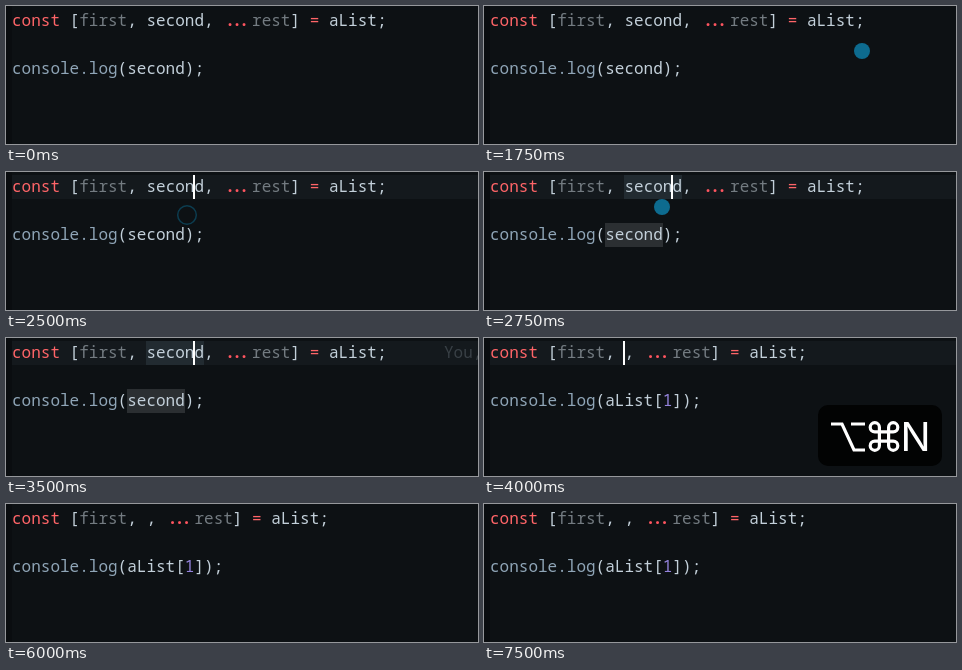
An HTML page for the animation above (8000 ms loop, 472 px wide and 138 px high).

```html
<!DOCTYPE html>
<html lang="en">
<head>
<meta charset="utf-8">
<title>Inline variable</title>
<style>
  html, body { margin: 0; width: 100%; height: 100%; overflow: hidden; background: #0d1114; }
  svg { display: block; width: 472px; height: 138px; }
  text { font: 16px "Noto Sans Mono", "DejaVu Sans Mono", monospace; white-space: pre; fill: #c3d0da; }
  .key { fill: #ff6568; }
  .unused { fill: #737b81; }
  .call { fill: #8fa5b7; }
  .num { fill: #9483dc; }
  .dots { fill: #ff5560; font-weight: 700; letter-spacing: -2.6px; }
  .blame { fill: #394046; }

  /* Every state holds until the next step. */
  .step { visibility: hidden; animation: 8s step-end infinite; }
  .before { animation-name: before; }
  .after { animation-name: after; }
  .line { animation-name: line; }
  .words { animation-name: words; }
  .note { animation-name: note; }
  .caret { animation-name: caret; fill: #fff; }
  .pointer { animation-name: pointer; fill: #0d6b8f; }
  .press { animation-name: press; fill: none; stroke: #0c3d50; stroke-width: 1.5; }
  .keys { animation-name: keys; }

  @keyframes before { 0% { visibility: visible } 50%, 100% { visibility: hidden } }
  @keyframes after { 0% { visibility: hidden } 50%, 100% { visibility: visible } }
  @keyframes line {
    0%, 62.5%, 100% { visibility: hidden }
    31.25% { visibility: visible }
  }
  @keyframes words {
    0%, 50%, 100% { visibility: hidden }
    34.375% { visibility: visible }
  }
  @keyframes note {
    0%, 50%, 100% { visibility: hidden }
    37.5% { visibility: visible }
  }
  @keyframes caret {
    0%, 37.5%, 56.25%, 100% { visibility: hidden; transform: translateX(187px) }
    31.25%, 43.75% { visibility: visible; transform: translateX(187px) }
    50% { visibility: visible; transform: translateX(139px) }
  }
  @keyframes pointer {
    0%, 31.25%, 37.5%, 100% { visibility: hidden; transform: translate(378px, 45px) }
    21.875% { visibility: visible; transform: translate(378px, 45px) }
    25% { visibility: visible; transform: translate(196px, 34px) }
    28.125% { visibility: visible; transform: translate(187px, 27px) }
    34.375% { visibility: visible; transform: translate(178px, 35px) }
  }
  @keyframes press {
    0%, 34.375%, 100% { visibility: hidden }
    31.25% { visibility: visible }
  }
  @keyframes keys {
    0%, 75%, 100% { visibility: hidden }
    50% { visibility: visible }
  }
</style>
</head>
<body>
<svg viewBox="0 0 472 138">
  <rect width="472" height="138" fill="#0d1114"/>
  <rect width="6" height="138" fill="#0a0d10"/>
  <rect class="step line" x="6" y="3" width="466" height="24" fill="#14191d"/>
  <g class="step words">
    <rect x="140" y="3" width="58" height="24" fill="#222b31"/>
    <rect x="121" y="51" width="58" height="24" fill="#2b2f32"/>
  </g>

  <g class="step before">
    <text x="6" y="20"><tspan class="key">const</tspan> [<tspan class="unused">first</tspan>, second, <tspan class="dots" dx="2">...</tspan><tspan class="unused" dx="5.8">rest</tspan>] <tspan class="key">=</tspan> aList;</text>
    <text x="6" y="68"><tspan class="call">console.log</tspan>(second);</text>
  </g>
  <g class="step after">
    <text x="6" y="20"><tspan class="key">const</tspan> [<tspan class="unused">first</tspan>, , <tspan class="dots" dx="2">...</tspan><tspan class="unused" dx="5.8">rest</tspan>] <tspan class="key">=</tspan> aList;</text>
    <text x="6" y="68"><tspan class="call">console.log</tspan>(aList[<tspan class="num">1</tspan>]);</text>
  </g>
  <g class="step note"><text class="blame" x="438" y="20">You,</text></g>

  <rect class="step caret" y="3" width="2" height="24"/>
  <circle class="step pointer" r="8"/>
  <circle class="step press" cx="181" cy="43" r="9.3"/>

  <g class="step keys">
    <rect x="334" y="67" width="124" height="61" rx="10" fill="#020303"/>
    <g fill="none" stroke="#fff" stroke-width="3.2">
      <path d="M347 86h11l12 26h11M367 86h14"/>
      <path transform="translate(400 98.5)" d="M-4.6-9.2a4.6 4.6 0 1 0-4.6 4.6h18.4a4.6 4.6 0 1 0-4.6-4.6v18.4a4.6 4.6 0 1 0 4.6-4.6h-18.4a4.6 4.6 0 1 0 4.6 4.6z"/>
    </g>
    <text x="416.5" y="113" style="font: 40px Inter, sans-serif; fill: #fff">N</text>
  </g>
</svg>
</body>
</html>
```
